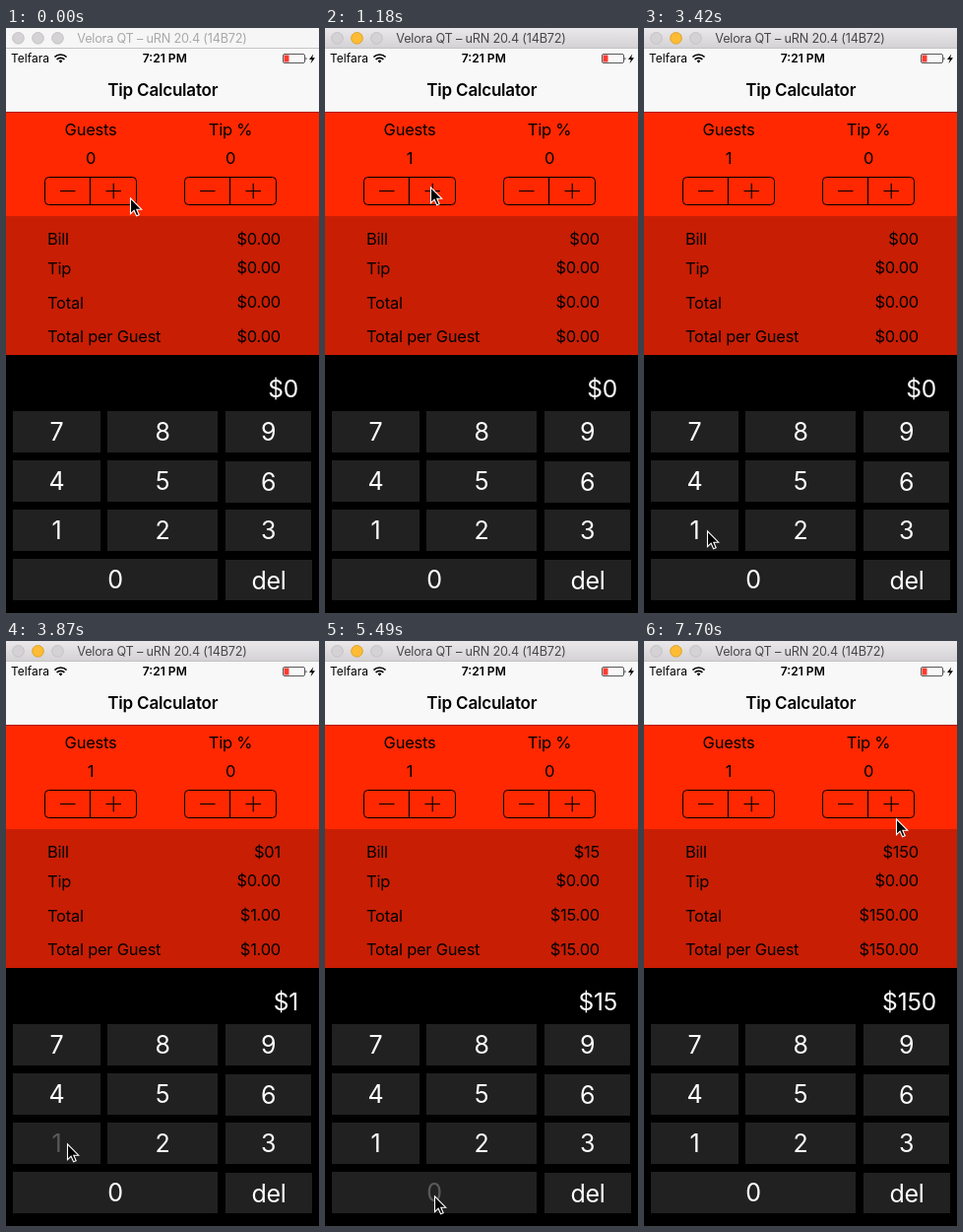
Animation of 318x594 px, one loop 8 s. Source, as an HTML page:

```html
<!DOCTYPE html>
<html lang="en">
<head>
<meta charset="utf-8">
<title>Tip Calculator</title>
<style>
  html, body { margin: 0; width: 100%; height: 100%; overflow: hidden; background: #000; }
  svg { display: block; width: 318px; height: 594px; font-family: Inter, Roboto, "Liberation Sans", sans-serif; }
  .label { font-size: 16.5px; letter-spacing: -.25px; }
  .key { font-size: 25px; letter-spacing: -.3px; fill: #fff; text-anchor: middle; }
  .mid { text-anchor: middle; }
  .end { text-anchor: end; }
</style>
</head>
<body>
<svg id="stage" viewBox="0 0 318 594">
  <defs>
    <linearGradient id="chrome" x2="0" y2="1">
      <stop stop-color="#eae8ea"/><stop offset="1" stop-color="#d3d1d3"/>
    </linearGradient>
  </defs>
  <rect width="318" height="594"/>
  <rect y="21" width="318" height="64" fill="#f8f8f8"/>
  <rect y="85" width="318" height="106" fill="#ff2800"/>
  <rect y="85" width="318" height="1" fill="#b21b00"/>
  <rect y="191" width="318" height="141" fill="#c81e04"/>

  <rect id="bar" width="318" height="21"/>
  <rect y="20" width="318" height="1" fill="#c4c4c4"/>
  <g id="lights"></g>
  <text id="windowTitle" class="mid" x="158.5" y="15" font-size="12.7" letter-spacing="-.2">Velora QT – uRN 20.4 (14B72)</text>

  <text x="5" y="35.3" font-size="12">Telfara</text>
  <g fill="none" stroke="#000" stroke-width="1.7">
    <path d="M49.4 29.5A8.7 8.7 0 0 1 61.6 29.5M51.6 32A5.6 5.6 0 0 1 59.4 32"/>
    <path d="M53.6 33.5A2.8 2.8 0 0 1 57.4 33.5L55.5 35.6Z" fill="#000" stroke="none"/>
  </g>
  <text class="mid" x="161.3" y="35.3" font-size="12.1" font-weight="600">7:21 PM</text>
  <rect x="281.5" y="26.5" width="22" height="9" rx="1.5" fill="none" stroke="#333" stroke-width=".8"/>
  <rect x="282.5" y="27.5" width="5" height="7" fill="#ff3b30"/>
  <path d="M304.5 29.4Q306.5 31 304.5 32.8Z" fill="#333"/>
  <path d="M312.2 26.5L308 32H310.8L309.6 36L314 30.3H311.2Z"/>
  <text class="mid" x="159.3" y="69" font-size="17" font-weight="600" letter-spacing="-.2">Tip Calculator</text>

  <g id="panel"></g>
  <g id="pad"></g>
  <path id="cursor" d="M.5 .8V16.6L4.1 13.2L6.6 18.8L9.2 17.7L6.8 12.2H11.7Z" stroke="#fff" stroke-width="1.1"/>
</svg>
<script>
const LOOP = 8000;
const $ = id => document.getElementById(id);

function add(parent, tag, attrs, text) {
  const el = document.createElementNS("http://www.w3.org/2000/svg", tag);
  for (const name in attrs) el.setAttribute(name, attrs[name]);
  if (text !== undefined) el.textContent = text;
  return parent.appendChild(el);
}

const lights = [12.5, 32.5, 52.5].map(cx => add($("lights"), "circle", { cx, cy: 10.3, r: 5.8 }));

const panel = $("panel");
const label = (x, y, text, align = "") => add(panel, "text", { x, y, class: "label " + align }, text);

function stepper(x, title, titleY) {
  label(x, titleY, title, "mid");
  const count = label(x, 138, "0", "mid");
  add(panel, "rect", { x: x - 46.5, y: 151.5, width: 93, height: 28, rx: 4, fill: "none", stroke: "#000" });
  add(panel, "path", {
    d: `M${x - .5} 151.5v28M${x - 31} 165.5h15.5M${x + 15.5} 165.5h15.5m-7.75 -7.75v15.5`,
    fill: "none", stroke: "#000", "stroke-width": 1.2
  });
  return count;
}

const guests = stepper(86, "Guests", 109);
stepper(228, "Tip %", 108.5);

const [bill, tip, total, share] = [["Bill", 220], ["Tip", 249.5], ["Total", 284.5], ["Total per Guest", 319]]
  .map(([name, y]) => {
    label(42, y, name);
    return label(279, y - .5, "", "end");
  });
tip.textContent = "$0.00";

const pad = $("pad");
const entry = add(pad, "text", { x: 297, y: 374.5, "font-size": 24.5, "letter-spacing": -.2, fill: "#fff", class: "end" });
const keys = {};
function key(name, x, y, width, height = 42) {
  add(pad, "rect", { x, y, width, height, fill: "#212121" });
  keys[name] = add(pad, "text", { x: x + width / 2, y: y + 30, class: "key" }, name);
}
["789", "456", "123"].forEach((row, r) => {
  const y = 389 + 50 * r;
  key(row[0], 7, y, 89);
  key(row[1], 103, y, 112);
  key(row[2], 223, y + (r === 1 ? 1 : 0), 87);
});
key("0", 7, 539, 208);
key("del", 223, 540, 88, 41);

// Each track is a list of [start time, ...state]; states hold until the next one.
const pointer = [
  [0, 126, 172], [150, 113, 167], [290, 107, 164], [1040, 107, 161],
  [2230, 170, 240], [2380, 198, 312], [2830, 149, 407], [2980, 112, 455],
  [3130, 88, 487], [3270, 72, 504], [3420, 64, 510], [3570, 62, 510],
  [4010, 100, 492], [4160, 154, 464], [4310, 160, 462],
  [4600, 135, 535], [4750, 114, 575], [5200, 112, 566], [5340, 111, 563],
  [6960, 250, 289], [7110, 259, 226], [7260, 260, 196], [7400, 258, 185], [7550, 256, 180]
];
const amounts = [[0, 0, "$0.00"], [1040, 0, "$00"], [3870, 1, "$01"], [4460, 15, "$15"], [5640, 150, "$150"]];
const presses = [
  [0, "", 1], [3720, "1", .25], [4010, "1", .6], [4160, "", 1],
  [4310, "5", .25], [4600, "5", .6], [4750, "", 1],
  [5340, "0", .25], [5780, "0", .6], [5930, "", 1]
];
const at = (track, t) => track.findLast(state => state[0] <= t).slice(1);

function render(t) {
  const active = t >= 890;
  $("bar").setAttribute("fill", active ? "url(#chrome)" : "#f6f6f6");
  $("windowTitle").setAttribute("fill", active ? "#484848" : "#a9a9a9");
  lights.forEach((light, i) => {
    const lit = active && i === 1;
    light.setAttribute("fill", lit ? "#fdbc33" : "#d4d2d4");
    light.setAttribute("stroke", lit ? "#e0a12c" : "#c4c2c4");
  });

  const [amount, billText] = at(amounts, t);
  guests.textContent = t >= 1040 ? 1 : 0;
  bill.textContent = billText;
  total.textContent = share.textContent = "$" + amount.toFixed(2);
  entry.textContent = "$" + amount;

  const [pressed, opacity] = at(presses, t);
  for (const name in keys) keys[name].setAttribute("opacity", name === pressed ? opacity : 1);
  $("cursor").setAttribute("transform", `translate(${at(pointer, t).join(" ")})`);
}

const start = performance.now();
function tick() {
  render((performance.now() - start) % LOOP);
  requestAnimationFrame(tick);
}
tick();
</script>
</body>
</html>
```
